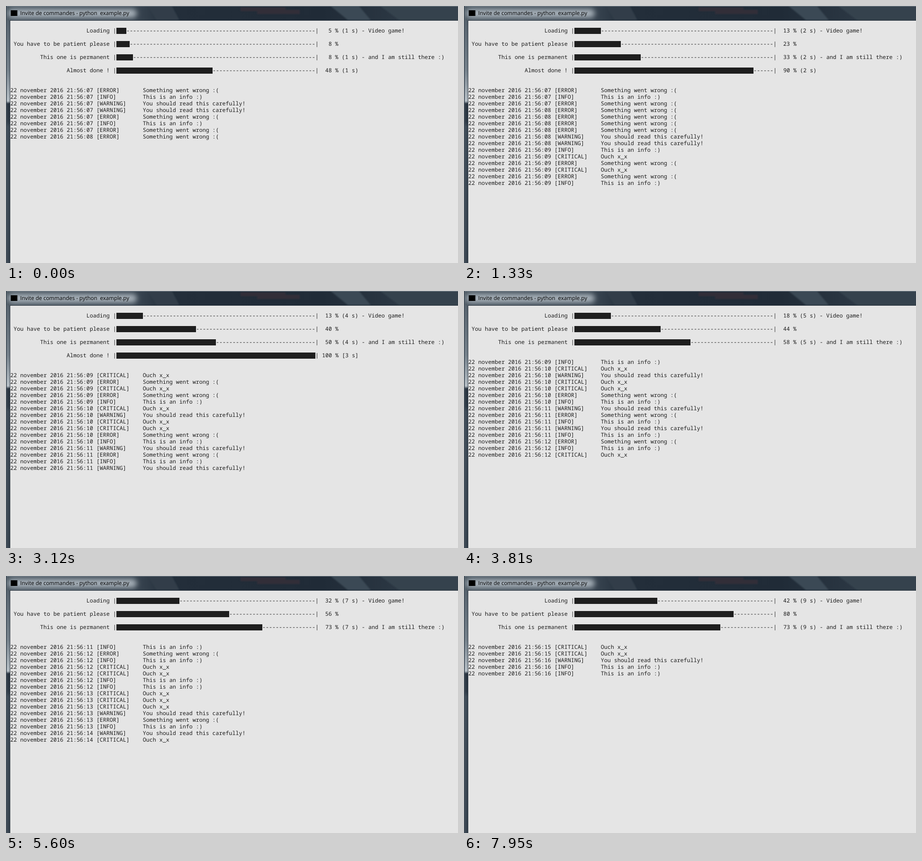
An HTML page for the animation above (8000 ms loop, 954 by 543 pixels).

```html
<!DOCTYPE html>
<html lang="en">
<head>
<meta charset="utf-8">
<title>Progress bars</title>
<style>
  html, body { margin: 0; width: 100%; height: 100%; overflow: hidden; background: #e5e5e5; }
  svg { display: block; width: 954px; height: 543px; }
  text { white-space: pre; text-rendering: geometricPrecision; }
  #console text { font: 11.6667px "Noto Sans Mono", "DejaVu Sans Mono", monospace; fill: #1c1c1c; }
  .title { font: 11.5px "Open Sans", "Noto Sans", sans-serif; fill: #000; }
</style>
</head>
<body>
<svg viewBox="0 0 954 543" xmlns="http://www.w3.org/2000/svg">
  <defs>
    <linearGradient id="bar">
      <stop offset="0" stop-color="#4a5660"/>
      <stop offset=".3" stop-color="#35414d"/>
      <stop offset=".36" stop-color="#232e3a"/>
      <stop offset=".7" stop-color="#202b37"/>
      <stop offset="1" stop-color="#34414d"/>
    </linearGradient>
    <linearGradient id="side" x2="0" y2="1">
      <stop offset="0" stop-color="#4c5863"/>
      <stop offset=".25" stop-color="#74808a"/>
      <stop offset=".37" stop-color="#b4bdc4"/>
      <stop offset=".38" stop-color="#2a3541"/>
      <stop offset=".45" stop-color="#2e3a46"/>
      <stop offset=".47" stop-color="#3d4a56"/>
      <stop offset="1" stop-color="#37434f"/>
    </linearGradient>
    <filter id="soft" x="-20%" y="-100%" width="140%" height="300%"><feGaussianBlur stdDeviation="6"/></filter>
    <filter id="slight"><feGaussianBlur stdDeviation="1.5"/></filter>
    <clipPath id="top"><rect width="954" height="30"/></clipPath>
  </defs>
  <rect width="954" height="543" fill="url(#side)"/>
  <g clip-path="url(#top)">
    <rect width="954" height="30" fill="url(#bar)"/>
    <g filter="url(#slight)">
      <path d="M300 0H350L366 30H318Z" fill="#303c48"/>
      <path d="M495 3H590V8H620V17H530V11H495Z" fill="#332f39"/>
      <path d="M685 0H745L770 30H722Z" fill="#3b4854"/>
      <path d="M790 0H954V30H830Z" fill="#35424e"/>
    </g>
    <rect x="4" y="6" width="272" height="19" rx="9" fill="#a7b1b9" filter="url(#soft)"/>
    <path d="M0 .5H954" stroke="#77838d"/>
  </g>
  <path d="M.5 0V543" stroke="#26313c"/>
  <path d="M1.5 2V543" stroke="#75818b" stroke-opacity=".6"/>
  <rect x="10" y="9" width="14" height="12" fill="#000"/>
  <text class="title" x="30" y="19">Invite de commandes - python  example.py</text>
  <rect x="8" y="30" width="946" height="513" fill="#27313b"/>
  <rect x="9" y="31" width="945" height="512" fill="#e5e5e5"/>
  <g id="console"></g>
</svg>
<script>
const LOOP = 8000, LEFT = 9, CELL = 7, LINE = 14, WIDTH = 60;
const starts = [0, 250, 800, 1330, 2040, 2580, 3120, 3810, 4320, 4920, 5600, 6110, 6790, 7390, 7950];
const elapsed = [1, 1, 2, 2, 3, 4, 4, 5, 5, 6, 7, 7, 8, 8, 9];
const logged = [8, 12, 16, 19, 23, 26, 29, 33, 36, 40, 44, 47, 51, 54, 57];
const SHRINK_STEP = 11;

const bars = [
  { name: "Loading", note: " - Video game!", timed: true,
    values: [2, 3, 3, 5, 5, 5, 5, 7, 9, 11, 12, 13, 14, 15, 16].map(n => Math.round(n / 38 * 100)) },
  { name: "You have to be patient please", note: "",
    values: [7.4, 12, 16, 23, 29, 35, 40, 44, 47, 50, 56, 60, 66, 73, 80] },
  { name: "This one is permanent", note: " - and I am still there :)", timed: true,
    values: [8, 18, 27, 33, 40, 45, 50, 58, 65, 73, 73, 73, 73, 73, 73] },
  { name: "Almost done !", note: "", timed: true,
    values: [48, 70, 90, 90, 90, 100, 100] }
];

const levels = {
  E: ["ERROR", "Something went wrong :("],
  I: ["INFO", "This is an info :)"],
  W: ["WARNING", "You should read this carefully!"],
  C: ["CRITICAL", "Ouch x_x"]
};

// One group of messages per second, starting at 21:56:07.
const log = "EIWWEIE EEEEWW ICECEI CWCCEI WEIWI EICCII CCCWEI WCEICC WIEICC WII"
  .split(" ").flatMap((group, i) => [...group].map(key => {
    const [level, message] = levels[key];
    const second = String(7 + i).padStart(2, "0");
    return `22 november 2016 21:56:${second} ` + `[${level}]`.padEnd(14) + message;
  }));

const root = document.getElementById("console");

function add(tag, attrs, content = "") {
  const node = document.createElementNS("http://www.w3.org/2000/svg", tag);
  for (const key in attrs) node.setAttribute(key, attrs[key]);
  node.textContent = content;
  root.append(node);
}

function print(row, column, content) {
  add("text", { x: LEFT + column * CELL, y: 56 + row * LINE }, content);
}

function drawBar(bar, row, step) {
  const value = bar.values[step];
  const filled = Math.round(value / 100 * WIDTH);
  const time = value === 100 ? " [3 s]" : ` (${elapsed[step]} s)`;
  const percent = String(Math.ceil(value)).padStart(3);
  print(row, 0, bar.name.padStart(30) + " |");
  print(row, 32 + filled, "-".repeat(WIDTH - filled) + `| ${percent} %` + (bar.timed ? time : "") + bar.note);
  add("rect", { x: LEFT + 32 * CELL, y: 46 + row * LINE, width: filled * CELL, height: 13, fill: "#1e1e1e" });
}

function draw(step) {
  root.replaceChildren();
  const active = bars.filter(bar => step < bar.values.length);
  active.forEach((bar, i) => drawBar(bar, i * 2, step));
  const end = logged[step];
  const limit = step < SHRINK_STEP ? 15 : 5;
  log.slice(Math.max(0, end - limit), end)
    .forEach((line, i) => print(active.length * 2 + 1 + i, 0, line));
}

let shown = -1;
function tick() {
  const time = performance.now() % LOOP;
  const step = starts.findLastIndex(start => start <= time);
  if (step !== shown) draw(shown = step);
  requestAnimationFrame(tick);
}
tick();
</script>
</body>
</html>
```
